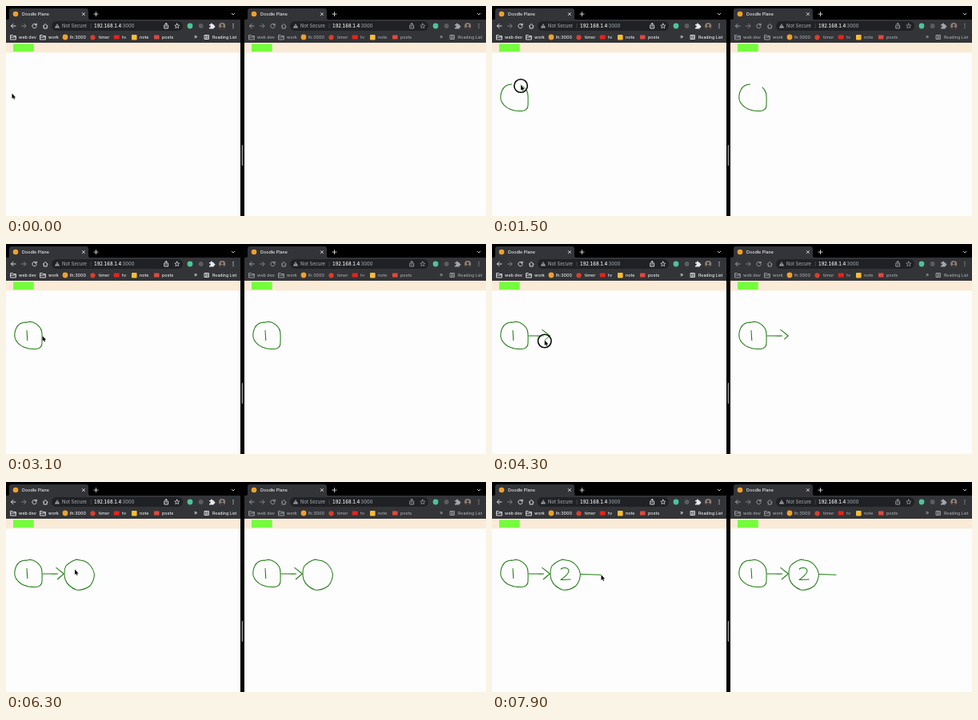
Recreate the animation shown at these times as an HTML page. Size 600x263 px, loop 8 s.

```html
<!DOCTYPE html>
<html lang="en">
<head>
<meta charset="utf-8">
<title>Shared drawing</title>
<style>
  html, body { margin: 0; width: 100%; height: 100%; overflow: hidden; background: #000; }
  svg { display: block; width: 600px; height: 263px; }
  text { font-family: Inter, Roboto, sans-serif; font-size: 5.4px; font-weight: 500; white-space: pre; }
  .address { font-size: 5.7px; font-variant-numeric: tabular-nums; }
  .line { fill: none; stroke-width: .9; stroke-linecap: round; stroke-linejoin: round; }
  .ink { fill: none; stroke: #1f7d12; stroke-width: 1.05; stroke-linejoin: round; }
</style>
</head>
<body>
<svg id="stage" viewBox="0 0 600 263"></svg>
<script>
const LOOP = 8000, STEP = 100, REMOTE_LAG = 40;
const stage = document.getElementById('stage');

// Pen strokes: start, end (ms), path
const strokes = [
  [700, 1600, 'M25 98C19 98 15 101 13 105C11 109 10.5 113 11 117C12 122 17 127 22 129C28 131.5 35 132 40 131C43 130 45 127 45 124C45 119 45.5 113 44.5 109C43 103 36 97.5 30 97.2L24 98.5'],
  [2100, 2500, 'M26 108L26.8 121'],
  [3200, 3500, 'M45.5 115C52 114.6 58 115.5 65 115'],
  [3850, 4350, 'M62.5 107.2L72.3 115L64 122'],
  [5025, 6050, 'M89 97C84 98 79 101 75 105C72.5 109 72.5 117 74 122C76 128 82 133 88 135C94 136 101 133 105 130C109 125 110.5 120 110.4 115C109 107 103 101 98 99L88 97'],
  [6400, 7200, 'M86 109.5C87 107 95 106 96 111C96 116 90 119 86 122.5L98.5 122'],
  [7650, 7900, 'M110.5 115.5L136.5 116.3']
];

const text = (x, y, s, fill, extra = '') => `<text x="${x}" y="${y}" fill="${fill}" ${extra}>${s}</text>`;
const rect = (x, y, w, h, fill, r = 0) => `<rect x="${x}" y="${y}" width="${w}" height="${h}" rx="${r}" fill="${fill}"/>`;
const dot = (x, y, r, fill) => `<circle cx="${x}" cy="${y}" r="${r}" fill="${fill}"/>`;
const line = (d, color) => `<path class="line" d="${d}" stroke="${color}"/>`;

const folder = (x, c) => line(`M${x - 3} 36.5h2.3l1 1h3v4.5h-6.3zM${x - 3} 39h6.3`, c);

function bookmarks(c) {
  const labels = [[16, 'web dev'], [53, 'work'], [80, 'lh:3000'], [116, 'timer'], [145, 'tv'], [167, 'note'], [195, 'posts']];
  return folder(9, c) + folder(46, c) + dot(74, 39, 3.4, '#f0a02c') + dot(108.5, 39.3, 3.1, '#d8402c')
    + rect(134.7, 36.6, 7, 5, '#e8231c', 1) + rect(157, 36, 6.6, 6.6, '#f8bd32', 1) + rect(185, 36.6, 6.5, 5, '#df4a3e', .6)
    + labels.map(([x, s]) => text(x, 41, s, c)).join('');
}

function browser(x, width, ink, c) {
  const right = width - 293, grey = '#9aa0a6';
  return `<g transform="translate(${x} 0)">`
    + rect(0, 0, width, 263, '#fefdfe') + rect(0, 0, width, 46, '#333438') + rect(0, 0, width, 17, '#000')
    + `<path d="M2 17q2 0 2-2V6q0-3 3-3h93q3 0 3 3v9q0 2 2 2z" fill="#333438"/>`
    + dot(12, 10, 3.3, '#f0a02c') + text(20, 12.1, 'Doodle Plane', '#e8eaed')
    + line('M95.3 8.5l3.2 3.2m0-3.2l-3.2 3.2M112.5 7.6v5m-2.5-2.5h5', '#dadce0')
    + line('M12 25H6.5m2.5-2.6L6.4 25L9 27.6', c)
    + line('M19.5 25H25m-2.5-2.6L25.1 25l-2.6 2.6', '#85888c')
    + line('M37.9 23.7a2.7 2.7 0 1 0 .3 2M38.2 22v2h-2', c)
    + line('M46.3 25.2l2.9-2.7l2.9 2.7M47.2 25v3h4v-3', c)
    + rect(57, 19, 164 + right, 12, '#202124', 6)
    + `<path d="M64 22l3.2 5.6h-6.4z" fill="${grey}"/>` + rect(63.6, 23.8, .8, 1.9, '#202124')
    + text(70, 27.1, 'Not Secure', grey, 'style="font-size:5.8px"') + rect(105.8, 22, .5, 6, '#5f6368')
    + text(110, 27.1, `192.168.1.4<tspan fill="${grey}">:3000</tspan>`, '#fff', 'class="address"')
    + bookmarks(c)
    + `<g transform="translate(${right} 0)">`
    + line('M282.2 9.2l1.8 1.8l1.8-1.8', '#dadce0')
    + line('M198.6 24h-.8v4h4.8v-4h-.8M200.2 26v-4.6m-1.4 1.4l1.4-1.4l1.4 1.4', c)
    + `<path class="line" style="stroke-width:.7" stroke="${c}" d="M213.8 22l.9 2l2.1.2l-1.6 1.4l.5 2.1l-1.9-1.1l-1.9 1.1l.5-2.1l-1.6-1.4l2.1-.2z"/>`
    + dot(230, 25, 3.4, '#4cc598') + dot(243.6, 25, 2.9, '#5b5d61')
    + `<path d="M254 23h1.8a1.2 1.2 0 1 1 2.3 0h1.7v1.7a1.2 1.2 0 1 1 0 2.3v1.4H254v-1.7a1.2 1.2 0 1 0 0-2.2z" fill="${c}"/>`
    + dot(270.2, 25, 4, '#8d8074') + dot(270.2, 24, 1.5, '#39302d') + `<path d="M267 27.4q3.2-3 6.4 0q-3.2 3.2-6.4 0z" fill="#39302d"/>`
    + [22.7, 25, 27.3].map(y => dot(284, y, .65, c)).join('')
    + text(235, 41, '»', c, 'style="font-size:7px"')
    + line('M248.4 36.5h5v5h-5zM250 36.5v5M251 38.2h1.3m-1.3 1.6h1.3', c) + text(258, 41, 'Reading List', c, 'style="font-size:5.2px"')
    + '</g>'
    + rect(0, 46, width, 12.4, '#faebd7') + rect(9, 47.4, 25.7, 9.8, '#74fd3c')
    + `<g id="${ink}">${strokes.map(s => `<path class="ink" d="${s[2]}"/>`).join('')}</g></g>`;
}

stage.innerHTML = rect(0, 0, 600, 263, '#000')
  + browser(0, 293, 'local', '#e8eaed') + browser(298, 302, 'remote', '#a3a6aa')
  + rect(294.6, 174, 1.6, 26, '#909092', .8)
  + `<g id="cursor"><circle id="ring" cy="1" r="8.3" fill="#fff" fill-opacity=".4" stroke="#0b0b0b" stroke-width="1.6"/>
     <path d="M0 0V6.6L1.5 5.3L2.6 7.6L3.6 7.1L2.6 4.9H4.6Z" fill="#000" stroke="#fff" stroke-width=".5" paint-order="stroke"/></g>`;

const cursor = document.getElementById('cursor'), ring = document.getElementById('ring');
const [local, remote] = ['local', 'remote'].map(id => [...document.getElementById(id).children]);
const lengths = local.map(p => p.getTotalLength());
const clamp = v => Math.max(0, Math.min(1, v));
const progress = (i, t) => clamp((t - strokes[i][0]) / (strokes[i][1] - strokes[i][0]));
const along = (i, f) => local[i].getPointAtLength(lengths[i] * f);
const mix = (a, b, f) => ({ x: a.x + (b.x - a.x) * f, y: a.y + (b.y - a.y) * f });

function pointer(t) {
  const next = strokes.findIndex(s => t < s[1]);
  if (next < 0) return along(strokes.length - 1, 1);
  const start = strokes[next][0];
  if (t >= start) return along(next, progress(next, t));
  if (next === 0) {
    const rest = mix({ x: 7.5, y: 109.5 }, { x: 8.5, y: 108.8 }, clamp(t / 300));
    return mix(rest, along(0, 0), clamp((t - 400) / 300));
  }
  const end = strokes[next - 1][1];
  const f = clamp((t - end) / (start - end) / .7);
  return mix(along(next - 1, 1), along(next, 0), f * f * (3 - 2 * f));
}

function reveal(paths, t) {
  paths.forEach((p, i) => {
    const f = progress(i, t);
    p.style.visibility = f ? 'visible' : 'hidden';
    p.style.strokeDasharray = f < 1 ? `${lengths[i] * f} 999` : 'none';
  });
}

function draw(now) {
  const t = Math.floor(now % LOOP / STEP) * STEP;
  const { x, y } = pointer(t);
  cursor.setAttribute('transform', `translate(${x} ${y})`);
  ring.style.display = strokes.some(s => t >= s[0] && t < s[1]) ? '' : 'none';
  reveal(local, t);
  reveal(remote, t - REMOTE_LAG);
}

const began = performance.now();
function tick() {
  draw(performance.now() - began);
  requestAnimationFrame(tick);
}
tick();
</script>
</body>
</html>
```
